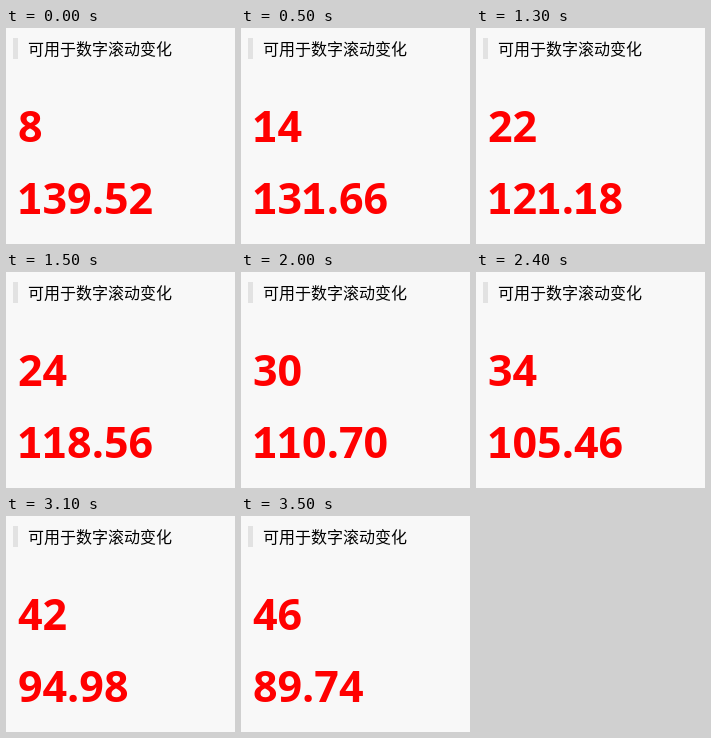
Animation of 229 by 216 pixels, one loop 3.6 s. Source, as an HTML page with a canvas:

```html
<!DOCTYPE html>
<html lang="zh-CN">
<meta charset="utf-8">
<title>数字滚动</title>
<style>
  html, body { margin: 0; width: 100%; height: 100%; overflow: hidden; background: #f8f8f8; }
  canvas { display: block; }
</style>
<canvas id="stage" width="229" height="216"></canvas>
<script>
const ctx = document.getElementById('stage').getContext('2d');
const LOOP = 3600;

function drawNumber(text, baseline) {
  let x = 12;
  for (const ch of text) {
    const one = ch === '1';
    ctx.fillText(ch, one ? x - 1 : x, baseline);
    if (one) ctx.fillRect(x + 2.5, baseline - 5, 19.5, 5); // foot of the one
    x += ctx.measureText(ch).width;
  }
}

function draw(t) {
  ctx.fillStyle = '#f8f8f8';
  ctx.fillRect(0, 0, 229, 216);
  ctx.fillStyle = '#e2e2e2';
  ctx.fillRect(7, 10, 5, 21);

  ctx.fillStyle = '#000';
  ctx.font = '16px "Noto Sans CJK SC", "Noto Sans CJK", sans-serif';
  ctx.fillText('可用于数字滚动变化', 22, 27);

  // the screen refreshes every 100 ms, the counters tick every 183.5 ms
  const step = Math.floor((Math.floor(t / 100) * 100 + 52) / 183.5);
  ctx.fillStyle = '#f00';
  ctx.font = '650 43px "Open Sans", "Noto Sans", sans-serif';
  drawNumber(String(8 + 2 * step), 114);
  drawNumber((139.52 - 2.62 * step).toFixed(2), 186);
}

function frame() {
  draw(performance.now() % LOOP);
  requestAnimationFrame(frame);
}
frame();
</script>
</html>
```
